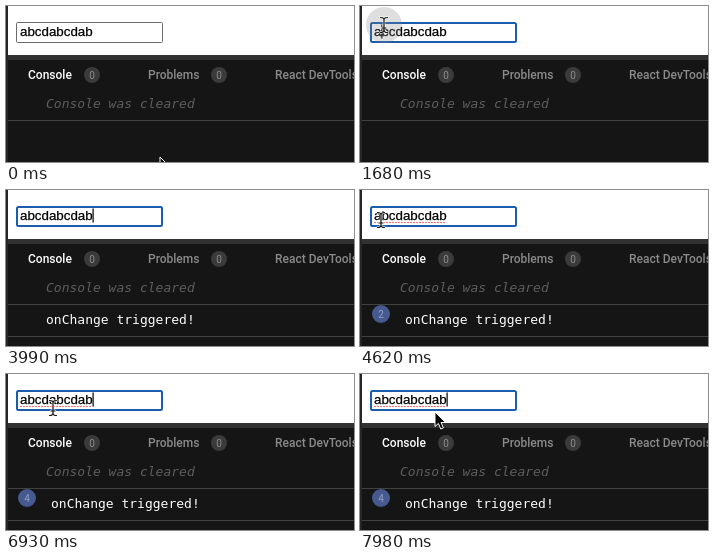
An HTML page that plays this animation: 348x156 px, repeating every 8 s.

```html
<!DOCTYPE html>
<html lang="en">
<head>
<meta charset="utf-8">
<title>Input and console</title>
<style>
html, body { margin: 0; width: 100%; height: 100%; overflow: hidden; background: #fff; }
svg { display: block; }
text { white-space: pre; }
.field { font: 13.333px "Liberation Sans", Arial, sans-serif; stroke: #000; stroke-width: .25px; }
.tab { font: 500 12px Roboto, sans-serif; fill: #8b8b8b; }
.tab.on { fill: #fff; }
.count { font: 10px Roboto, sans-serif; fill: #8f8f8f; text-anchor: middle; }
.log { font: 13px "DejaVu Sans Mono", monospace; fill: #fff; }
.muted { font-style: italic; fill: #5e5e5e; }
#beam { fill: none; stroke-linecap: round; }
</style>
</head>
<body>
<svg width="348" height="156" viewBox="0 0 348 156">
  <defs>
    <path id="beamShape" d="M-3.5 -7.5Q0 -7.5 0 -5V5Q0 7.5 -3.5 7.5M3.5 -7.5Q0 -7.5 0 -5M3.5 7.5Q0 7.5 0 5M-2 3H2"/>
    <g id="zero">
      <circle r="8" fill="#3b3b3b"/>
      <text class="count" y="3.5">0</text>
    </g>
  </defs>
  <rect width="348" height="156" fill="#fff"/>
  <rect y="49" width="348" height="107" fill="#151515"/>
  <rect y="49" width="348" height="5" fill="#313131"/>
  <rect width="2" height="156" fill="#262626"/>

  <rect id="border" x="10.5" y="16.5" width="146" height="20" rx="1" fill="#fff" stroke="#6b6b6b"/>
  <rect id="ring" x="11" y="17" width="145" height="19" rx="1.5" fill="#fff" stroke="#1c5cad" stroke-width="2"/>
  <text class="field" x="14" y="30.3">abcdabcdab</text>
  <path id="spell" d="M15 32.5H87" stroke="#e8473f" stroke-width="1.6" stroke-linecap="round" stroke-dasharray="0 3"/>
  <rect id="caret" y="18.5" width="1.2" height="14"/>

  <text class="tab on" x="22" y="73">Console</text>
  <use href="#zero" x="86" y="69"/>
  <text class="tab" x="142" y="73">Problems</text>
  <use href="#zero" x="213" y="69"/>
  <text class="tab" x="269" y="73">React DevTools</text>

  <text class="log muted" x="40" y="102">Console was cleared</text>
  <path d="M2 114.5H348" stroke="#414141"/>
  <g id="entry">
    <text class="log" id="message" y="134.4">onChange triggered!</text>
    <path d="M2 146.5H348" stroke="#414141"/>
    <g id="badge">
      <circle cx="21" cy="124" r="9" fill="#465a8f"/>
      <text class="count" id="repeat" x="21" y="127.5" style="fill:#94a3c8">2</text>
    </g>
  </g>

  <g id="pointer">
    <circle id="press" r="18" fill="#808080" fill-opacity=".25"/>
    <path id="arrow" d="M0 0V14.5L3.4 11.4L5.8 17L8.4 15.9L6 10.5H10.6Z" stroke="#fff" stroke-linejoin="round"/>
    <g id="beam">
      <use href="#beamShape" stroke="#fff" stroke-width="2.6" stroke-opacity=".8"/>
      <use href="#beamShape" stroke="#111" stroke-width="1.2"/>
    </g>
  </g>
</svg>
<script>
const LOOP = 8000, TICK = 70, BLINK = 490, DELAY = 140;
const TEXT_X = 14, LETTER = 7.25, LETTERS = 10;
const $ = id => document.getElementById(id);

const clicks = [1610, 3430, 4760];
const keys = [2240, 3990, 5320, 6580];
const home = { x: 154, y: 151 };
// the pointer eases to (x, y) between two times and rests there
const moves = [
  [70, 490, 66, 6], [630, 840, 89, 27], [980, 1400, 24, 19],
  [2730, 2800, 24, 18], [2940, 3080, 13, 30], [4480, 4620, 21, 30],
  [5460, 5460, 21, 32], [6930, 6930, 47, 34], [7000, 7210, 30, 41],
  [7280, 7420, 60, 6], [7490, 7700, 94, 20], [7770, 7980, 75, 38]
].map(([from, to, x, y]) => ({ from, to, x, y }));

const last = (times, t) => Math.max(-Infinity, ...times.filter(s => s <= t));
const show = (id, on) => { $(id).style.display = on ? "" : "none"; };
const smooth = k => k * k * (3 - 2 * k);

function pointerAt(t) {
  let p = home;
  for (const m of moves.filter(m => m.from <= t)) {
    const k = smooth(Math.min(1, (t - m.from + TICK) / (m.to - m.from + TICK)));
    p = { x: p.x + (m.x - p.x) * k, y: p.y + (m.y - p.y) * k };
  }
  return p;
}

// a click sets the caret between letters, a key sends it to the end
function caretAt(t) {
  const click = last(clicks, t), key = last(keys, t);
  const since = t - Math.max(click, key);
  const letter = key > click ? LETTERS
    : Math.max(0, Math.round((pointerAt(click).x - TEXT_X) / LETTER));
  return { x: TEXT_X + letter * LETTER, on: since < LOOP && Math.floor(since / BLINK) % 2 === 0 };
}

function draw(time) {
  const t = Math.floor(time / TICK) * TICK;
  const { x, y } = pointerAt(t);
  const inField = x > 10 && x < 157 && y > 14 && y < 38;
  // typing hides the pointer until it moves again
  const visible = last(keys, t) <= last(moves.map(m => m.from), t);
  $("pointer").setAttribute("transform", `translate(${x} ${y})`);
  show("pointer", visible);
  show("beam", inField);
  show("arrow", !inField);
  show("press", t - last(clicks, t) < DELAY);

  const focused = t >= clicks[0];
  show("border", !focused);
  show("ring", focused);
  const caret = caretAt(t);
  show("caret", focused && caret.on);
  $("caret").setAttribute("x", caret.x);

  const count = keys.filter(k => k + DELAY <= t).length;
  show("spell", count && t - last(keys, t) >= DELAY);
  show("entry", count);
  show("badge", count > 1);
  $("message").setAttribute("x", count > 1 ? 45 : 40);
  $("repeat").textContent = count;
}

const start = performance.now();
function frame() {
  draw((performance.now() - start) % LOOP);
  requestAnimationFrame(frame);
}
frame();
</script>
</body>
</html>
```
